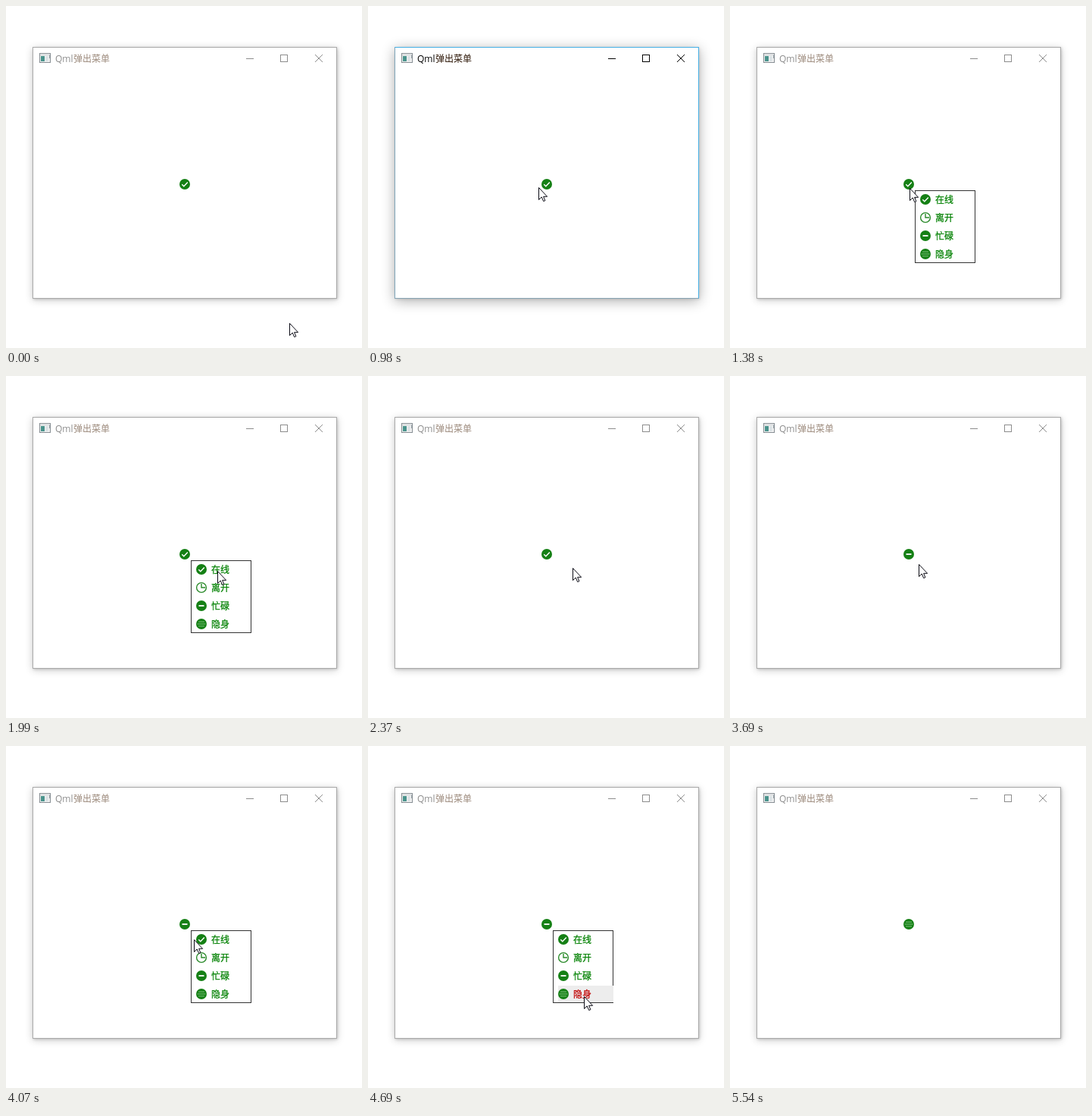
An HTML page for the animation above (5.77 s loop, 470 by 451 pixels).

```html
<!DOCTYPE html>
<html lang="zh">
<head>
<meta charset="utf-8">
<title>Qml弹出菜单</title>
<style>
html, body { margin: 0; width: 100%; height: 100%; overflow: hidden; background: #fff; }
#win {
  position: absolute; left: 35px; top: 54px; width: 400px; height: 330px;
  background: #fff; border: 1px solid #aaa;
  box-shadow: 1px 1px 3px rgba(0,0,0,.16), 0 2px 10px rgba(0,0,0,.2);
}
#win.active {
  border-color: #45b0e6 #45b0e6 #86a3b3 #7fa6ba;
  box-shadow: 1px 1px 3px rgba(0,0,0,.1), 0 3px 16px rgba(0,0,0,.32);
}
svg { position: absolute; left: 0; top: 0; }
text { font: 12px "Open Sans", "Noto Sans CJK SC", "Noto Sans CJK", sans-serif; }
.crisp { shape-rendering: crispEdges; }
#bar { --ink: #8c8c8c; --han: #9c8a7c; }
#bar.active { --ink: #000; --han: #2c1606; }
#bar text { fill: var(--ink); }
#bar .han { fill: var(--han); }
#bar .btn { stroke: var(--ink); fill: none; }
#items text { fill: #008000; stroke: #008000; stroke-width: .25px; }
#items text.hit { fill: #c00000; stroke: #c00000; }
</style>
</head>
<body>
<div id="win"></div>
<svg width="470" height="451" viewBox="0 0 470 451">
  <defs>
    <g id="online">
      <circle r="7" fill="#158015"/>
      <path d="M-3.7 .2L-1.2 2.7L3.8 -2.6" fill="none" stroke="#fff" stroke-width="1.4"/>
    </g>
    <g id="away" fill="none" stroke="#2a8a2a" stroke-width="1.4">
      <circle r="6.4"/>
      <path d="M0 -5V0H5"/>
    </g>
    <g id="busy">
      <circle r="7" fill="#158015"/>
      <path d="M-3.5 0H3.5" stroke="#fff" stroke-width="1.8"/>
    </g>
    <g id="hidden">
      <circle r="7" fill="#158015"/>
      <path d="M-4 -2.9H4M-5.5 0H5.5M-4 2.9H4" stroke="#7cc07c"/>
    </g>
  </defs>

  <g id="bar">
    <g class="crisp">
      <rect x="44.5" y="62.5" width="14" height="12" fill="#f2f2f2" stroke="#858d92"/>
      <path d="M45 64.5H58" stroke="#c9cfd2"/>
      <rect x="46" y="66" width="5" height="7" fill="#4a938c"/>
      <rect x="52" y="66" width="4" height="7" fill="#dde3e6"/>
      <rect x="57" y="65" width="1" height="4" fill="#9aa4aa"/>
    </g>
    <text x="65" y="74">Qml</text>
    <text class="han" x="89" y="74">弹出菜单</text>
    <path class="btn crisp" d="M317 69.5H327M362.5 64.5H371.5V73.5H362.5Z"/>
    <path class="btn" d="M408 64L418 74M418 64L408 74"/>
  </g>

  <use id="status" x="236" y="235"/>

  <g id="menu">
    <rect class="crisp" x="244.5" y="243.5" width="79" height="95" fill="#fff" stroke="#333"/>
    <rect id="glow" class="crisp" x="251" width="73" height="22" fill="#ededed"/>
    <g id="items"></g>
  </g>

  <path id="cursor" d="M.5 .5V16.5L4.2 12.9L6.7 18.5L8.9 17.6L6.6 12.3H11.6Z" fill="#fff" stroke="#0a0a14"/>
</svg>

<script>
const LOOP = 5770, STEP = 76;
const $ = id => document.getElementById(id);

const icons = ['online', 'away', 'busy', 'hidden'];
const labels = ['在线', '离开', '忙碌', '隐身'];
$('items').innerHTML = icons.map((icon, i) => {
  const y = 255 + 24 * i;
  return `<use href="#${icon}" x="258" y="${y}"/><text x="271" y="${y + 4.5}">${labels[i]}</text>`;
}).join('');
const texts = [...document.querySelectorAll('#items text')];

// Each pick: window gets focus, menu opens, row is pressed, menu closes
const picks = [
  { focus: 600, open: 1380, press: 2140, close: 2220, row: 0 },
  { focus: 2610, open: 2760, press: 3300, close: 3370, row: 2 },
  { focus: 3840, open: 3920, press: 4690, close: 4770, row: 3 }
];

// Pointer strokes: start, end, x, y
const home = [374, 418];
const strokes = [
  [70, 530, 214, 80], [900, 980, 225, 239], [1060, 1210, 237, 240],
  [1680, 1990, 279, 257], [2300, 2530, 242, 242], [2840, 3150, 272, 300],
  [3540, 3690, 249, 248], [3770, 3840, 240, 240], [4000, 4380, 285, 330],
  [5150, 5540, 456, 462]
];

// The pointer advances in equal steps along each stroke
function tip(t) {
  let [x, y] = home;
  for (const [a, b, tx, ty] of strokes) {
    if (t < a) break;
    const n = Math.round((b - a) / STEP) + 1;
    const p = Math.min(1, Math.floor((t - a) / STEP + 1.03) / n);
    x += (tx - x) * p;
    y += (ty - y) * p;
  }
  return [Math.round(x), Math.round(y)];
}

function draw(t) {
  const during = (from, to) => picks.find(p => t >= p[from] && t < p[to]);
  const active = !!during('focus', 'open');
  const hit = during('press', 'close');
  const chosen = picks.filter(p => t >= p.close).pop() || picks[0];

  $('win').classList.toggle('active', active);
  $('bar').classList.toggle('active', active);
  $('status').setAttribute('href', '#' + icons[chosen.row]);
  $('menu').style.display = during('open', 'close') ? '' : 'none';
  $('glow').style.display = hit ? '' : 'none';
  if (hit) $('glow').setAttribute('y', 244 + 24 * hit.row);
  texts.forEach((el, i) => el.classList.toggle('hit', !!hit && hit.row === i));
  $('cursor').setAttribute('transform', `translate(${tip(t)})`);
}

const start = performance.now();
function loop() {
  draw((performance.now() - start) % LOOP);
  requestAnimationFrame(loop);
}
draw(0);
requestAnimationFrame(loop);
</script>
</body>
</html>
```
